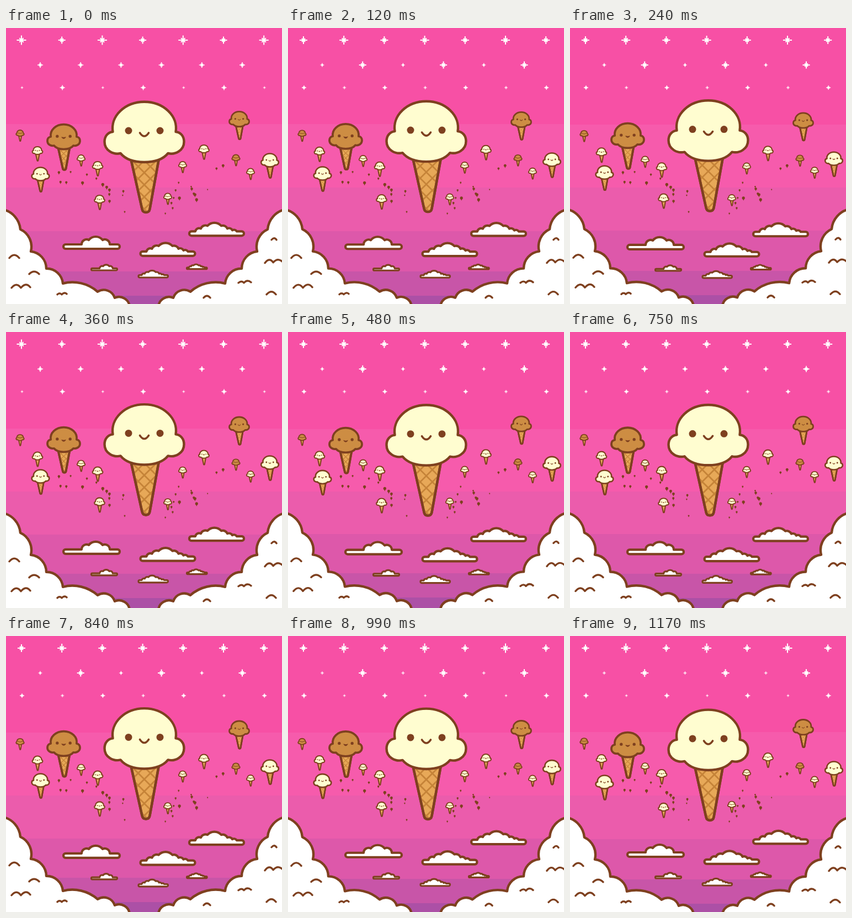
An HTML page with a canvas for the animation above (1.2 s loop, 500x500 px).

```html
<!DOCTYPE html>
<html lang="en">
<head>
<meta charset="utf-8">
<title>Floating ice creams</title>
<style>
html, body { margin: 0; width: 100%; height: 100%; overflow: hidden; }
canvas { display: block; }
</style>
</head>
<body>
<canvas id="stage" width="500" height="500"></canvas>
<script>
const ctx = document.getElementById('stage').getContext('2d');
const LOOP = 1200, STEP = 30, TWINKLE = 180;
const OUTLINE = '#7e401f', CREAM = '#fffdd0', CARAMEL = '#cd8d43';
const BANDS = ['#f750a5', '#f65bac', '#eb5cac', '#dd58aa', '#c855a8', '#ac50a6'];

const scoop = new Path2D('M-57 0A57.5 48 0 1 1 57 0C66 1 72 8 72 18C72 34 56 42 43 39C34 50 18 55 0 55S-34 50 -43 39C-56 42 -72 34 -72 18C-72 8 -66 1 -57 0Z');
const wafer = new Path2D('M-25 46L-4 140Q-3 146 3 146Q9 146 10 140L27 46Z');
const smile = new Path2D('M-8 2Q0 14 8 2');
const lowCloud = new Path2D('M-47 0a4 4 0 0 1 0 -8h29a9 9 0 0 1 13 -8a16 16 0 0 1 25 0a9 9 0 0 1 13 8h14a4 4 0 0 1 0 8Z');
const tallCloud = new Path2D('M-46 0a4 4 0 0 1 0 -8h7a7 7 0 0 1 10 -5a9 9 0 0 1 12 -5a17 17 0 0 1 25 0a9 9 0 0 1 11 5a7 7 0 0 1 9 3a6 6 0 0 1 8 2h9a4 4 0 0 1 0 8Z');
const creases = new Path2D('M6 416q9 -11 18 0M42 445q9 -9 18 0M10 470q9 -11 17 0q9 -11 17 -1M93 482q4 -4 8 0q5 -5 9 -1M481 383q5 -6 9 0M469 425q8 -11 15 -1q9 -10 18 0M421 461q6 -5 10 0q6 -7 13 -1M472 482q9 -10 17 0M358 488q6 -7 12 0');

const flocks = [
  { colour: CARAMEL, scale: .1, lift: -.5, spots: [[25.5, 190.5], [416.5, 235]] },
  { colour: CREAM, scale: .1, lift: -1.5, spots: [[136, 235.5], [320, 247.5], [293, 305]] },
  { colour: CREAM, scale: .13, lift: -1.5, spots: [[57, 222], [166, 249], [358.5, 219]] },
  { colour: CREAM, scale: .1, lift: 1.5, spots: [[443, 260]] },
  { colour: CREAM, scale: .13, lift: 1.5, spots: [[169.5, 310]] },
  { colour: CREAM, scale: .22, lift: 1.8, spots: [[62.5, 264.5], [478, 239.5]] },
  { colour: CARAMEL, scale: .25, lift: -1.5, spots: [[422.5, 165]] },
  { colour: CARAMEL, scale: .41, lift: 1.3, spots: [[104.5, 197]] },
  { colour: CREAM, scale: 1, lift: 1.5, spots: [[250.5, 188]] }
];

// path, x, y, scale
const clouds = [
  [lowCloud, 155, 400, 1], [tallCloud, 293.5, 412.8, 1], [tallCloud, 382, 376.3, 1],
  [lowCloud, 178, 439, .46], [tallCloud, 267, 452, .54], [tallCloud, 346, 436.7, .37]
];

// Every bump of the bank rises the same height above its chord.
function scallop(points, rise) {
  return points.map((p, i) => {
    if (!i) return 'M' + p;
    const [x, y] = points[i - 1];
    const r = rise / 2 + Math.hypot(p[0] - x, p[1] - y) ** 2 / (8 * rise);
    return `A${r} ${r} 0 0 1 ${p}`;
  }).join('');
}
const bank = new Path2D(scallop([[-6, 328], [26, 364], [45, 404], [73, 435], [103, 462], [166, 477], [197, 488], [224, 504]], 8) + 'L-6 504Z');

let seed = 7;
const random = () => (seed = seed * 16807 % 2147483647) / 2147483647;

// Far cones scatter to both sides and hang lower towards the middle.
const specks = Array.from({ length: 31 }, (_, i) => {
  const reach = 35 + 130 * random() ** 1.4;
  return {
    x: 250 + (i % 2 ? reach : -reach),
    y: 322 - .35 * reach + 56 * (random() - .5),
    size: 2 + 4 * random()
  };
});

function paint(path, fill, width) {
  ctx.fillStyle = fill;
  ctx.fill(path);
  ctx.strokeStyle = OUTLINE;
  ctx.lineWidth = width;
  ctx.stroke(path);
}

function dot(x, y, r) {
  ctx.beginPath();
  ctx.arc(x, y, r, 0, 7);
  ctx.fill();
}

function at(x, y, sx, sy, draw) {
  ctx.save();
  ctx.translate(x, y);
  ctx.scale(sx, sy);
  draw();
  ctx.restore();
}

function drawStar(x, y, size) {
  const arm = size / 2, diag = size * .22;
  ctx.strokeStyle = '#fff';
  ctx.lineCap = 'butt';
  ctx.lineWidth = Math.min(2, size * .16);
  ctx.beginPath();
  for (const [dx, dy] of [[arm, 0], [0, arm], [diag, diag], [diag, -diag]]) {
    ctx.moveTo(x - dx, y - dy);
    ctx.lineTo(x + dx, y + dy);
  }
  ctx.stroke();
  ctx.lineCap = 'round';
}

function drawStarRow(y, left, count, even, odd, swing) {
  for (let i = 0; i < count; i++)
    drawStar(left + 73.2 * i, y, i % 2 ? odd - swing : even + swing);
}

function drawWaffle() {
  ctx.save();
  ctx.clip(wafer);
  ctx.strokeStyle = '#c58338';
  ctx.lineWidth = 2.8;
  ctx.beginPath();
  for (let y = 0; y < 160; y += 22) {
    ctx.moveTo(-30, y);
    ctx.lineTo(30, y + 60);
    ctx.moveTo(-30, y + 60);
    ctx.lineTo(30, y);
  }
  ctx.stroke();
  ctx.restore();
}

function drawCone(x, y, s, colour) {
  const line = Math.min(4.4, 1.3 + 6 * s) / s;
  at(x, y, s, s, () => {
    paint(wafer, '#e7a858', line);
    if (s > .2) {
      drawWaffle();
      paint(wafer, 'transparent', line);
    }
    paint(scoop, colour, line);
    ctx.fillStyle = OUTLINE;
    const eye = Math.max(6.5, .9 / s);
    dot(-28.5, -2, eye);
    dot(28.5, -2, eye);
    paint(smile, s > .4 && s < 1 ? OUTLINE : 'transparent', Math.max(3.6, 1.1 / s));
  });
}

function drawSpeck({ x, y, size }) {
  const r = size * .46;
  ctx.fillStyle = OUTLINE;
  dot(x, y - size * .15, r);
  ctx.beginPath();
  ctx.moveTo(x - r * .6, y);
  ctx.lineTo(x + r * .6, y);
  ctx.lineTo(x, y + size * .75);
  ctx.fill();
}

function render(now) {
  const t = Math.floor(now % LOOP / STEP) * STEP;
  const wave = period => Math.cos(2 * Math.PI * t / period);
  const drift = wave(LOOP), twinkle = wave(TWINKLE);
  const bob = .8 * wave(LOOP / 2) + .2 * drift;

  const tops = [0, 175 - drift, 289, 367 + drift, 439 + 2 * drift, 483 + 2 * drift];
  tops.forEach((y, i) => {
    ctx.fillStyle = BANDS[i];
    ctx.fillRect(0, Math.round(y), 500, 500);
  });

  drawStarRow(22, 28, 7, 15, 15, 2 * twinkle);
  drawStarRow(67, 62, 6, 8, 12, 2 * twinkle);
  drawStarRow(108, 29, 7, 7, 7, -2 * twinkle);

  specks.forEach(drawSpeck);
  for (const { colour, scale, lift, spots } of flocks)
    for (const [x, y] of spots) drawCone(x, y + lift * (bob - 1), scale, colour);

  for (const [path, x, y, s] of clouds)
    at(x, y + 1.4 * (1 - drift), s, s, () => paint(path, '#fff', (s < 1 ? 3.2 : 4.2) / s));

  const sway = .75 * drift;
  for (const side of [1, -1])
    at(side > 0 ? 0 : 500, sway, side, 1, () => paint(bank, '#fff', 4.4));
  at(0, sway, 1, 1, () => paint(creases, 'transparent', 3.4));
}

ctx.lineJoin = ctx.lineCap = 'round';
const start = performance.now();
(function tick() {
  render(performance.now() - start);
  requestAnimationFrame(tick);
})();
</script>
</body>
</html>
```
